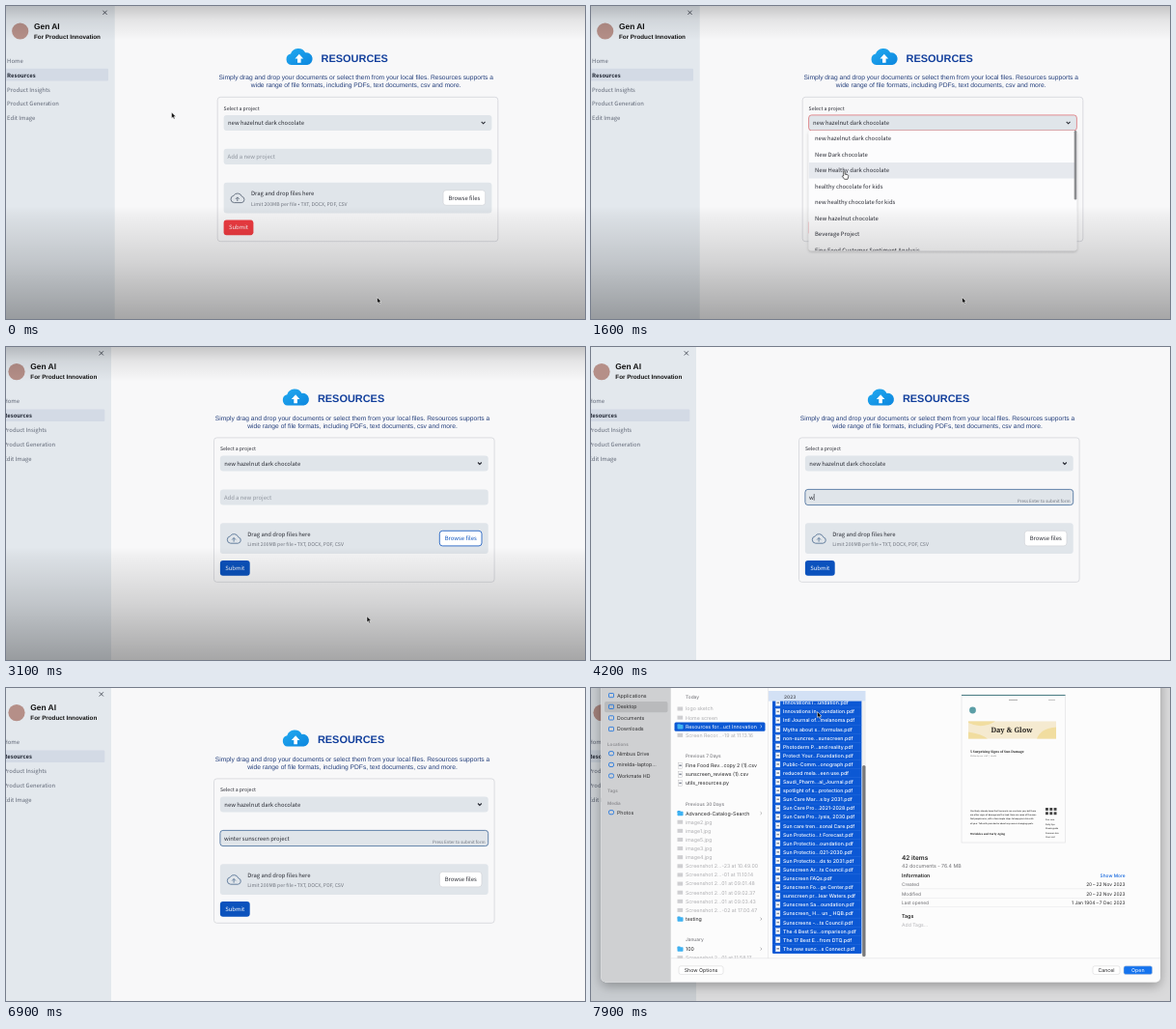
Recreate the animation shown at these times as an HTML page. Size 600 px wide and 324 px high, loop 8 s.

```html
<!DOCTYPE html>
<html lang="en">
<head>
<meta charset="utf-8">
<title>Resources upload</title>
<style>
  html, body { margin: 0; width: 100%; height: 100%; overflow: hidden; background: #f8f8f9; }
  svg { display: block; width: 600px; height: 324px; }
  text { white-space: pre; text-rendering: geometricPrecision; }
  .ui { font-family: "Noto Sans CJK JP", "Noto Sans CJK SC", "Noto Sans CJK", "Noto Sans", sans-serif; }
  .head { font-family: "Liberation Sans", Arial, sans-serif; }
  .mac { font-family: Inter, Roboto, sans-serif; }
  .serif { font-family: "Noto Serif", serif; }
</style>
</head>
<body>
<svg id="stage" viewBox="0 0 600 324" xmlns="http://www.w3.org/2000/svg"></svg>
<script>
const LOOP = 8000;
const INK = '#282a33', BLUE = '#0b52bd', RED = '#ef3b41', FIELD = '#e0e5ea', PICK = '#0c58d4';

const attrs = o => Object.entries(o).map(([k, v]) => `${k}="${v}"`).join(' ');
const rect = (x, y, width, height, fill, more = {}) =>
  `<rect ${attrs({ x, y, width, height, fill, ...more })}/>`;
const path = (d, more) => `<path ${attrs({ d, fill: 'none', ...more })}/>`;
const group = (id, body, more = {}) => `<g id="${id}" ${attrs(more)}>${body}</g>`;
const escape = s => s.replace(/&/g, '&amp;').replace(/</g, '&lt;');
const label = (cls, x, y, s, size, fill = INK, more = {}) =>
  `<text ${attrs({ class: cls, x, y, 'font-size': size, fill, ...more })}>${escape(s)}</text>`;
const ui = (...a) => label('ui', ...a);
const head = (...a) => label('head', ...a);
const mac = (...a) => label('mac', ...a);
const bold = { 'font-weight': 700 }, semi = { 'font-weight': 600 }, medium = { 'font-weight': 500 };
const end = { 'text-anchor': 'end' }, middle = { 'text-anchor': 'middle' };

const defs = `<defs>
  <linearGradient id="topShade" x2="0" y2="1">
    <stop stop-color="#000" stop-opacity=".2"/><stop offset=".4" stop-color="#000" stop-opacity=".08"/>
    <stop offset="1" stop-color="#000" stop-opacity="0"/></linearGradient>
  <linearGradient id="bottomShade" x2="0" y2="1">
    <stop stop-color="#000" stop-opacity="0"/><stop offset=".08" stop-color="#000" stop-opacity=".035"/>
    <stop offset=".5" stop-color="#000" stop-opacity=".15"/>
    <stop offset="1" stop-color="#000" stop-opacity=".33"/></linearGradient>
  <linearGradient id="sky" x2="1" y2="1"><stop stop-color="#22aaf0"/><stop offset="1" stop-color="#0c86de"/></linearGradient>
  <filter id="soft" x="-10%" y="-10%" width="120%" height="125%">
    <feDropShadow dx="0" dy="1.2" stdDeviation="1.6" flood-opacity=".22"/></filter>
  <filter id="deep" x="-10%" y="-10%" width="120%" height="125%">
    <feDropShadow dx="0" dy="4" stdDeviation="6" flood-opacity=".3"/></filter>
  <clipPath id="menuClip"><rect x="225.5" y="129" width="278" height="124.2" rx="3"/></clipPath>
  <clipPath id="fileClip"><rect x="83" y="0" width="202" height="280"/></clipPath>
</defs>`;

function sidebar() {
  const items = ['Home', 'Resources', 'Product Insights', 'Product Generation', 'Edit Image'];
  return rect(-10, -10, 122.7, 344, '#e3e8ed')
    + path('M100.4 4.7l4.2 4.2m0-4.2l-4.2 4.2', { stroke: '#444a55', 'stroke-width': .9 })
    + '<circle cx="14.7" cy="26" r="8.6" fill="#b58f88"/>'
    + head(29, 23.9, 'Gen AI', 8.4, '#111', bold)
    + head(29, 33.9, 'For Product Innovation', 6.27, '#111', bold)
    + rect(-6, 64.8, 112, 12.6, '#d3dae5', { rx: 1 })
    + items.map((s, i) => ui(1.1, 58.7 + i * 14.9, s, 5.9, i === 1 ? '#1d2330' : '#5f6675', i === 1 ? semi : {})).join('');
}

function header() {
  return path('M295.6 61a5.8 5.8 0 0 1-.6-11.4a8.3 8.3 0 0 1 15.2-1.3a6.4 6.4 0 0 1 2 12.7z', { fill: 'url(#sky)' })
    + path('M303.8 49.7l4.3 4.7h-2.5v4.3h-3.6v-4.3h-2.5z', { fill: '#fff' })
    + head(326.6, 57.8, 'RESOURCES', 10.95, '#123f9c', bold)
    + head(362.7, 76.3, 'Simply drag and drop your documents or select them from your local files. Resources supports a', 6.68, '#243f7c', middle)
    + head(362.7, 84.2, 'wide range of file formats, including PDFs, text documents, csv and more.', 6.68, '#243f7c', middle);
}

function form() {
  return rect(219.2, 94.3, 290.6, 149.4, 'none', { rx: 3, stroke: '#d3d5da', 'stroke-width': .8 })
    + ui(225.6, 107.9, 'Select a project', 5.17)
    + rect(225.6, 112.9, 277.8, 16, FIELD, { rx: 3, id: 'select', 'stroke-width': .7 })
    + ui(230, 123.2, 'new hazelnut dark chocolate', 5.9, INK, { id: 'chosen' })
    + rect(310.2, 117.6, .5, 6.8, INK, { id: 'selectCaret' })
    + path('M492.7 119.9l1.9 1.9l1.9-1.9', { stroke: INK, 'stroke-width': 1.1 })
    + rect(225.6, 147.8, 277.8, 16.2, FIELD, { rx: 3, id: 'input', 'stroke-width': .8 })
    + ui(229.6, 158, '', 5.9, INK, { id: 'typed' })
    + rect(0, 152.4, .6, 6.8, INK, { id: 'typeCaret' })
    + ui(500.2, 161.8, 'Press Enter to submit form', 4.43, '#70757f', { ...end, id: 'hint' })
    + rect(225.6, 182.7, 277.8, 31.8, FIELD, { rx: 3 })
    + path('M236.4 203.6a3.7 3.7 0 0 1-.5-7.3a4.7 4.7 0 0 1 8.5 .9a3.25 3.25 0 0 1-.3 6.4zM239.8 202v-4m-1.9 1.9l1.9-2l1.9 2',
      { id: 'cloud', 'stroke-width': 1, 'stroke-linejoin': 'round' })
    + ui(254, 196.3, 'Drag and drop files here', 5.9)
    + ui(254, 206.7, 'Limit 200MB per file • TXT, DOCX, PDF, CSV', 5.17, '#70757f')
    + rect(453, 190.7, 43.7, 15.6, '#fff', { rx: 3, id: 'browse', 'stroke-width': .8 })
    + ui(474.9, 200.7, 'Browse files', 5.9, INK, { ...middle, id: 'browseText' })
    + rect(225.6, 221.4, 30.8, 15.8, RED, { rx: 3, id: 'submit' })
    + ui(241, 231.4, 'Submit', 5.9, '#fff', middle);
}

function menu() {
  const items = ['new hazelnut dark chocolate', 'New Dark chocolate', 'New Healthy dark chocolate',
    'healthy chocolate for kids', 'new healthy chocolate for kids', 'New hazelnut chocolate', 'Beverage Project',
    'Fine Food Customer Sentiment Analysis', 'Fine Food Reviews Project', 'Lip Care Balm', 'Snack Food Industry Project'];
  const rows = rect(225.5, 162, 278, 16.5, '#e6e9ee', { id: 'hover' })
    + items.map((s, i) => ui(232, 139 + i * 16.57, s, 5.9)).join('');
  return rect(225.5, 129, 278, 124.2, '#fcfcfd', { rx: 3, filter: 'url(#soft)' })
    + `<g clip-path="url(#menuClip)">${group('rows', rows)}</g>`
    + rect(500.7, 129, 2.6, 71.5, '#8c8d90', { rx: 1.2, id: 'thumb' });
}

const folder = (x, y) => rect(x, y - 2.5, 3.2, 2, '#35a5ea', { rx: .6 }) + rect(x, y - 1.8, 6, 4.5, '#3fb2f2', { rx: .7 });
const sheet = (x, y, line = '#b4b4b8') =>
  rect(x, y - 3, 4.4, 5.9, '#fff', { stroke: line, 'stroke-width': .4 }) + rect(x + 1, y - .9, 2.4, 1.6, '#7f8694');
const chevron = (x, y, stroke) => path(`M${x} ${y - 1.4}l1.5 1.4l-1.5 1.4`, { stroke, 'stroke-width': .6 });

function places() {
  const names = [['Applications', 7.6], ['Desktop', 19.4], ['Documents', 30.9], ['Downloads', 42.5],
    ['Nimbus Drive', 67.7], ['mirelda-laptop...', 79.4], ['Workmate HD', 90.9], ['Photos', 128.7]];
  const titles = [['Locations', 58], ['Tags', 106], ['Media', 119.3]];
  return path('M10.5 -5H82.7V304.5H15.5a5 5 0 0 1-5-5z', { fill: '#cfd0d2' })
    + rect(14, 14, 65.5, 11.2, '#b9babc', { rx: 2 })
    + names.map(([s, y], i) => rect(18.5, y - 2.1, 5, 4.2, 'none', { rx: i > 3 ? 1.5 : .7, stroke: '#1670e0', 'stroke-width': .8 })
      + mac(27, y + 1.9, s, 5.25, '#2c2c2e')).join('')
    + titles.map(([s, y]) => mac(17, y + 1.7, s, 4.6, '#8d8d91', semi)).join('');
}

function recentFiles() {
  // Leading mark: "-" greyed out, "/" folder, "*" selected folder.
  const shots = ['-23 at 10.49.00', '-01 at 11.10.14', '01 at 09.01.48', '01 at 09.02.37', '01 at 09.03.43', '-02 at 17.00.47']
    .map(s => '-Screenshot 2...' + s);
  const sections = [
    [9.5, 12, 'Today', ['-logo sketch', '-Home screen', '*Resources for...uct Innovation', '-Screen Recor...-19 at 11.13.16']],
    [70.5, 9.8, 'Previous 7 Days', ['Fine Food Rev...copy 2 (1).csv', 'sunscreen_reviews (1).csv', 'utils_resources.py']],
    [119.8, 9.8, 'Previous 30 Days', ['/Advanced-Catalog-Search', '-image2.jpg', '-image1.jpg', '-image5.jpg', '-image3.jpg',
      '-image4.jpg', ...shots, '/testing']],
    [260.3, 9.8, 'January', ['/100', '-Screenshot 2...01 at 11.58.17']]
  ];
  const row = (file, y) => {
    const kind = '-*/'.includes(file[0]) ? file[0] : '';
    const picked = kind === '*', faded = kind === '-';
    const icon = picked || kind === '/' ? folder(89.5, y) + chevron(175.5, y, picked ? '#fff' : '#8b8b8f')
      : faded ? rect(89.5, y - 2, 5.6, 4, '#cfcfd2') : sheet(90.3, y);
    return (picked ? rect(86.5, y - 4.3, 94, 9.2, PICK, { rx: 1.5 }) : '') + icon
      + mac(98, y + 1.9, file.slice(kind.length), 5.25, picked ? '#fff' : faded ? '#adadb0' : '#252527');
  };
  return sections.map(([top, gap, title, files]) => mac(98, top + 1.7, title, 4.8, '#7d7d82', medium)
    + files.map((file, i) => row(file, top + gap + i * 9.12)).join('')).join('');
}

function selectedFiles() {
  const names = ['Innovations i...undation', 'Innovations in...oundation', 'Intl Journal of...melanoma', 'Myths about s...formulas',
    'non-suncree...sunscreen', 'Photoderm P...and reality', 'Protect Your...Foundation', 'Public-Comm...onograph',
    'reduced mela...een use', 'Saudi_Pharm...al_Journal', 'spotlight of s...protection', 'Sun Care Mar...s by 2031',
    'Sun Care Pro...2021-2028', 'Sun Care Pro...lysis, 2030', 'Sun care tren...sonal Care', 'Sun Protectio...t Forecast',
    'Sun Protectio...oundation', 'Sun Protectio...021-2030', 'Sun Protectio...ds to 2031', 'Sunscreen Ar...ts Council',
    'Sunscreen FAQs', 'Sunscreen Fo...ge Center', 'sunscreen pr...lear Waters', 'Sunscreen Sa...oundation',
    'Sunscreen_ H... un _ HQB', 'Sunscreens -...ts Council', 'The 4 Best Su...omparison', 'The 17 Best E...from DTQ',
    'The new sunc...s Connect'];
  return rect(188, 11, 92.5, 264, PICK, { rx: 1.5 })
    + names.map((s, i) => {
      const y = 15.4 + i * 9.09;
      return rect(188, y + 4.4, 92.5, .35, '#2f72de') + sheet(191.5, y, '#dfe6f5') + mac(199, y + 1.9, s + '.pdf', 5.2, '#fff', medium);
    }).join('')
    + rect(184, 3, 100.5, 10.6, '#d3e1f5') + mac(200, 11, '2023', 4.8, '#55585f', semi)
    + rect(280.8, 14, 4, 265, '#f0f0f0') + rect(281.2, 80, 3.3, 198, '#77787b', { rx: 1.6 });
}

function preview() {
  const facts = [['Created', '20\u2009–\u200922 Nov 2023'], ['Modified', '20\u2009–\u200922 Nov 2023'],
    ['Last opened', '1 Jan 1904\u2009–\u20097 Dec 2023']];
  const body = ['You likely already know that too much sun can burn you, but there', 'are other signs of damage worth a look. Here are some of the ones',
    'that people miss, with a few simple steps to keep your skin safe', 'all year. Talk with your doctor about any new or changing spots.'];
  const related = ['Sun care', 'Daily tips', 'Shade guide', 'Summer skin', 'Your visit'];
  const share = Array.from({ length: 6 }, (_, i) => rect(471 + i % 3 * 4.3, 124 + Math.floor(i / 3) * 4.3, 2.9, 2.9, '#444')).join('');
  return rect(384, 7, 107.5, 153, '#fcfcfc', { stroke: '#dedee0', 'stroke-width': .6 })
    + rect(384, 7, 107.5, 1, '#4d7f86') + rect(433, 11.9, 9, .7, '#888') + rect(474, 11.9, 7, .7, '#aaa')
    + '<circle cx="395.5" cy="23" r="3.4" fill="#5b9ea6"/>'
    + rect(391, 34.5, 91, 18, '#f5ead0')
    + path('M391 36q14 7 28-1.5h-28zM391 52.5v-7q14 2 20 7zM462 52.5q4-11 20-12v12z', { fill: '#f1dd9f' })
    + label('serif', 436, 46.2, 'Day & Glow', 7.4, '#26231f', { ...middle, ...bold })
    + label('serif', 393, 67.3, '5 Surprising Signs of Sun Damage', 3.3, '#222', semi)
    + mac(393, 71.4, 'Written by our staff  |  Health', 2, '#777')
    + body.map((s, i) => mac(393, 127.7 + i * 4.3, s, 2.15, '#333', semi)).join('') + share
    + related.map((s, i) => mac(471, 137 + i * 4.6, s, 2.2, '#444', semi)).join('')
    + label('serif', 393, 152, 'Wrinkles and Early Aging', 2.8, '#222', semi)
    + mac(322, 178.4, '42 items', 6.5, '#222', semi)
    + mac(322, 186.2, '42 documents - 76.4 MB', 5.25, '#6c6c70')
    + mac(322, 196.3, 'Information', 5.25, '#222', semi)
    + mac(553.5, 196.3, 'Show More', 4.8, '#0c62dd', { ...end, ...medium })
    + facts.map(([k, v], i) => {
      const y = 205.3 + i * 9.4;
      return mac(322, y, k, 4.8, '#6c6c70') + mac(553.5, y, v, 4.9, '#252527', end) + rect(322, y + 2.4, 231.5, .4, '#dedee0');
    }).join('')
    + mac(322, 238, 'Tags', 5.25, '#222', semi) + mac(322, 247, 'Add Tags...', 5.1, '#b4b4b8');
}

function dialog() {
  const button = (x, w, s, fill, ink) => rect(x, 287.8, w, 8.6, fill, { rx: 2, stroke: '#d0d0d3', 'stroke-width': .5 })
    + mac(x + w / 2, 293.9, s, 5.25, ink, middle);
  return rect(0, 0, 600, 324, '#000', { opacity: .12 })
    + rect(10.5, -20, 579.5, 324.5, '#fcfcfc', { rx: 5, filter: 'url(#deep)' })
    + places()
    + `<g clip-path="url(#fileClip)">${recentFiles()}${rect(183, 0, .5, 280, '#dcdcde')}${selectedFiles()}</g>`
    + preview()
    + rect(82.7, 279.6, 507.3, .5, '#d9d9db')
    + button(91, 46, 'Show Options', '#fff', '#252527')
    + button(520, 28, 'Cancel', '#fff', '#252527')
    + button(552, 29.6, 'Open', '#1573ee', '#fff');
}

const arrow = id => group(id, path('M0 0V6.2L1.5 4.9L2.5 7.1L3.6 6.6L2.6 4.5H4.5Z',
  { fill: '#111', stroke: '#fff', 'stroke-width': .5 }));
const hand = group('hand', path('M0 .5q.9-1 1.5 0v2.7l3 .6q.7.4.5 1.5l-.7 3h-3.4l-2.2-3q.2-1 1.3-.3z',
  { fill: '#fff', stroke: '#222', 'stroke-width': .7 }));

const stage = document.getElementById('stage');
stage.innerHTML = defs
  + group('page', rect(-10, -10, 630, 350, '#f8f8f9') + sidebar() + header() + form() + group('menu', menu()))
  + group('shade', rect(0, 0, 600, 36, 'url(#topShade)') + rect(0, 207, 600, 117, 'url(#bottomShade)'))
  + group('dialog', dialog())
  + arrow('idle') + arrow('arrow') + hand;

const el = Object.fromEntries([...stage.querySelectorAll('[id]')].map(n => [n.id, n]));
const set = (id, values) => { for (const k in values) el[id].setAttribute(k, values[k]); };
const show = (id, on) => set(id, { visibility: on ? 'visible' : 'hidden' });
const progress = (t, a, b) => Math.min(1, Math.max(0, (t - a) / (b - a)));
const ease = p => p * p * (3 - 2 * p);

// Pointer stops: time, x, y. Movement eases between neighbours.
const pointer = [[0, 171.5, 110], [350, 171.5, 110], [950, 262, 118], [1150, 262, 118], [1500, 261.7, 171],
  [2899, 261.7, 171], [2900, 374, 278.8], [3150, 374, 278.8], [3600, 262, 154], [6950, 262, 154],
  [7300, 474, 197], [7499, 474, 197], [7500, 234.5, 24.5], [LOOP, 234.5, 24.5]];

function pointerAt(t) {
  const i = pointer.findIndex((p, n) => n && t < p[0]);
  const [a, b] = [pointer[i - 1], pointer[i]];
  const p = ease(progress(t, a[0], b[0]));
  return [a[1] + (b[1] - a[1]) * p, a[2] + (b[2] - a[2]) * p];
}

const PHRASE = 'winter sunscreen project';

function render(t) {
  const second = t >= 2900, open = t >= 1150 && !second, focused = t >= 3700, picking = t >= 7500;
  set('page', { transform: second ? 'translate(-3.7 -.4)' : '' });

  const scroll = 63 * ease(progress(t, 1800, 2300));
  show('menu', open);
  set('rows', { transform: `translate(0 ${-scroll})` });
  set('thumb', { y: 129 + scroll * .571 });
  set('hover', { opacity: t >= 1400 && t < 1800 ? 1 : 0 });
  set('select', { stroke: open ? '#dc6266' : 'none' });
  set('selectCaret', { x: 230.3 + el.chosen.getComputedTextLength() });
  show('selectCaret', open && (t - 1100) % 1000 < 500);

  const count = t < 4100 ? 0 : Math.min(PHRASE.length, 1 + Math.max(0, Math.floor((t - 4250) / 95)));
  el.typed.textContent = count ? PHRASE.slice(0, count) : 'Add a new project';
  set('typed', { fill: count ? INK : '#8e949e' });
  set('typeCaret', { x: 229.8 + (count ? el.typed.getComputedTextLength() : 0) });
  show('typeCaret', focused && !picking && (t < 6400 || (t - 6400) % 1000 < 500));
  set('input', { stroke: focused ? '#3f6797' : 'none' });
  show('hint', count > 0);

  const hot = (second && t < 3300) || t >= 7250;
  set('browse', { stroke: hot ? BLUE : '#d3d6db' });
  set('browseText', { fill: hot ? BLUE : INK });
  set('submit', { fill: second ? BLUE : RED });
  set('cloud', { stroke: second ? '#66809f' : '#6d7887' });

  set('shade', { opacity: 1 - progress(t, 3300, 3600) });
  show('dialog', picking);

  const [x, y] = pointerAt(t);
  const pointing = t >= 1250 && t < 1800;
  const hidden = t >= 3750 && t < 6950;
  set('arrow', { transform: `translate(${x} ${y})` });
  set('hand', { transform: `translate(${x} ${y})` });
  set('idle', { transform: 'translate(384.5 301.5)' });
  show('arrow', !pointing && !hidden);
  show('hand', pointing);
  show('idle', !second);
}

const start = performance.now();
function tick() {
  render((performance.now() - start) % LOOP);
  requestAnimationFrame(tick);
}
tick();
</script>
</body>
</html>
```
